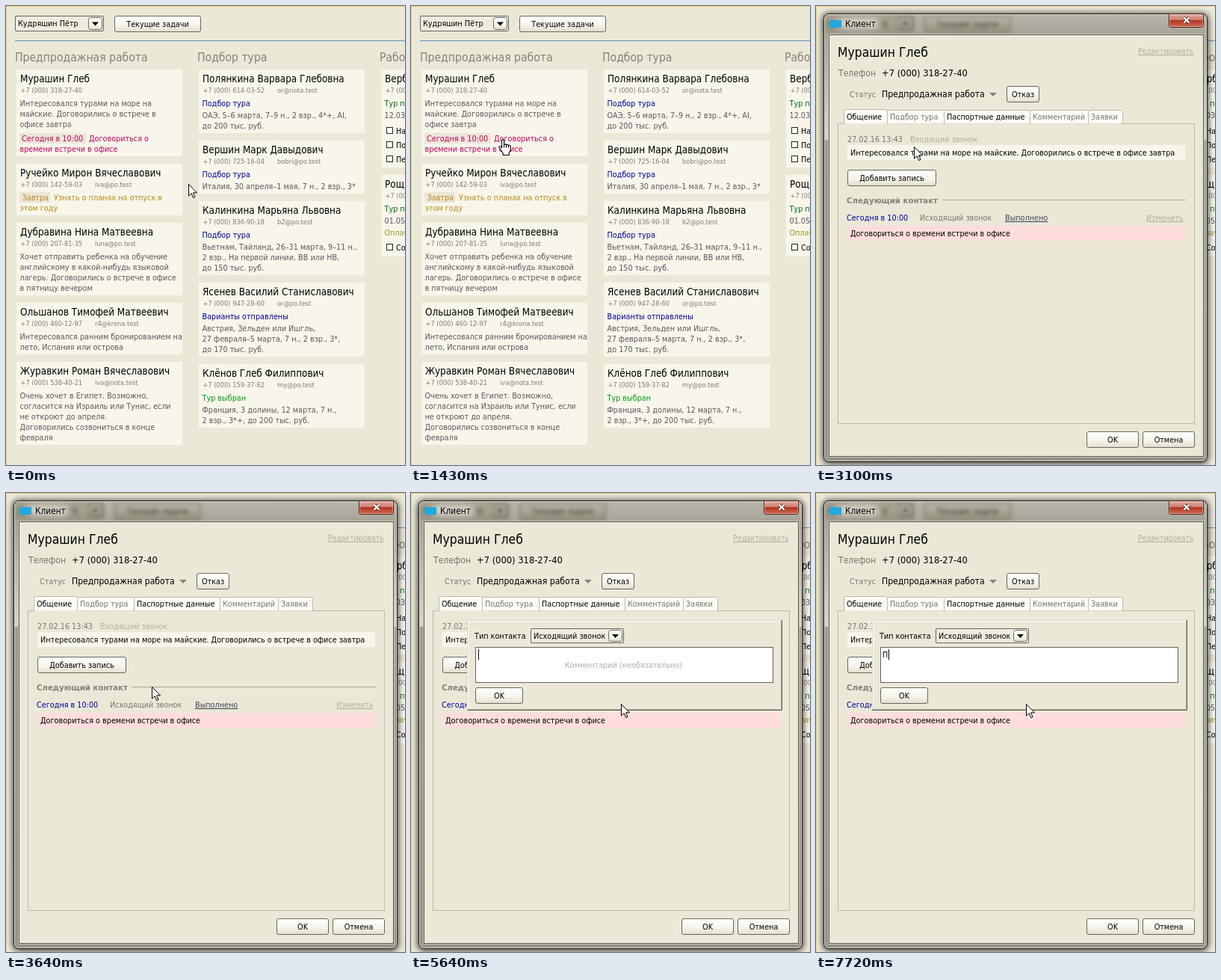
Recreate the animation shown at these times as an HTML page. Size 534 by 614 pixels, loop 8000 ms.

```html
<!DOCTYPE html>
<html lang="ru">
<head>
<meta charset="utf-8">
<title>Клиенты</title>
<style>
html, body { margin: 0; width: 100%; height: 100%; overflow: hidden; background: #ebe8d8; }
svg { display: block; width: 534px; height: 614px; }
text {
  font: 10.75px "DejaVu Sans Condensed", "Liberation Sans", Arial, sans-serif;
  fill: #000; white-space: pre;
}
.mid { text-anchor: middle; }
.head { font-size: 15.6px; fill: #858279; }
.name { font-size: 13.4px; }
.small { font-size: 9.2px; fill: #7d7b76; }
.body { fill: #5b5660; }
.blue { fill: #00009c; }
.green { fill: #009a1c; }
.dark { fill: #006b12; }
.olive { fill: #8f9a1e; }
.red { fill: #c4005e; }
.gold { fill: #b98a16; }
.grey { fill: #78756c; }
.pale { fill: #b3afa0; }
.link { text-decoration: underline; }
.slate { fill: #43435a; }
.big { font-size: 17.4px; }
.mid13 { font-size: 12.8px; }
.mid12 { font-size: 12.1px; }
.bold { font-size: 11.3px; font-weight: bold; fill: #858279; }
.card { fill: #f8f6ea; }
.tag { fill: #ebe6d8; }
.btn { fill: url(#face); stroke: #696860; }
.box { fill: #fff; stroke: #222; }
.combo { fill: #efecdf; stroke: #65645c; }
.haze { filter: url(#haze); mix-blend-mode: multiply; }

/* every change is a hard step on one shared 8 s clock */
#dialog, #popup, #hint, #caret, #typed, #arrow, #hand, #cursor, #glow {
  animation: 8s step-end infinite;
}
#dialog { animation-name: dialog; }
#popup { animation-name: popup; }
#hint { animation-name: hint; }
#caret { animation-name: caret; }
#typed { animation-name: typed; }
#arrow { animation-name: arrow; }
#hand { animation-name: hand; }
#cursor { animation-name: move; }
#glow { animation-name: glow; }
@keyframes dialog { 0% { visibility: hidden } 26.375%, 100% { visibility: visible } }
@keyframes popup { 0% { visibility: hidden } 70.5%, 100% { visibility: visible } }
@keyframes hint { 0%, 96.5%, 100% { visibility: hidden } 70.5% { visibility: visible } }
@keyframes caret {
  0%, 79.125%, 91.25%, 100% { visibility: hidden }
  70.5%, 84.5% { visibility: visible }
}
@keyframes typed { 0% { visibility: hidden } 96.5%, 100% { visibility: visible } }
@keyframes glow { 0%, 45.5%, 100% { visibility: hidden } 44% { visibility: visible } }
@keyframes arrow {
  0%, 26.375%, 70.5%, 100% { visibility: visible }
  11.125%, 50.75% { visibility: hidden }
}
@keyframes hand {
  0%, 26.375%, 70.5%, 100% { visibility: hidden }
  11.125%, 50.75% { visibility: visible }
}
@keyframes move {
  0% { transform: translate(244px, 238px) }
  6.25% { transform: translate(232px, 226px) }
  8% { transform: translate(208px, 207px) }
  9.625% { transform: translate(172px, 192px) }
  11.125% { transform: translate(143px, 183px) }
  13% { transform: translate(136px, 181px) }
  14.5% { transform: translate(131px, 180px) }
  16% { transform: translate(127px, 179px) }
  17.875% { transform: translate(123px, 178px) }
  26.375% { transform: translate(122px, 178px) }
  38.75% { transform: translate(131px, 188px) }
  40.375% { transform: translate(139px, 206px) }
  42.25% { transform: translate(145px, 217px) }
  44% { transform: translate(159px, 233px) }
  45.5% { transform: translate(195px, 259px) }
  47.375% { transform: translate(235px, 270px) }
  49.125% { transform: translate(262px, 280px) }
  50.75% { transform: translate(276px, 284px) }
  52.625%, 100% { transform: translate(281px, 282px) }
}
</style>
</head>
<body>
<svg viewBox="0 0 534 614">
  <defs>
    <linearGradient id="face" x2="0" y2="1">
      <stop stop-color="#fffffc"/><stop offset=".6" stop-color="#f5f3ea"/><stop offset="1" stop-color="#e2decd"/>
    </linearGradient>
    <linearGradient id="glass" x2="0" y2="1">
      <stop stop-color="#b8b5aa"/><stop offset=".05" stop-color="#a5a297"/>
      <stop offset=".28" stop-color="#d6d3c9"/><stop offset=".282" stop-color="#9d9a90"/>
      <stop offset="1" stop-color="#96938a"/>
    </linearGradient>
    <linearGradient id="shut" x2="0" y2="1">
      <stop stop-color="#e3b3a8"/><stop offset=".48" stop-color="#cc7768"/>
      <stop offset=".5" stop-color="#b03420"/><stop offset="1" stop-color="#d46d54"/>
    </linearGradient>
    <filter id="soft" x="-20%" y="-100%" width="140%" height="300%"><feGaussianBlur stdDeviation="4"/></filter>
    <filter id="haze" x="-10%" y="-50%" width="120%" height="200%"><feGaussianBlur stdDeviation="2.5"/></filter>
    <filter id="shade" x="-5%" y="-5%" width="110%" height="110%"><feGaussianBlur stdDeviation="4.5"/></filter>
  </defs>
  <g id="board"></g>
  <g id="dialog"></g>
  <g id="popup"></g>
  <g id="cursor" stroke="#000" fill="#fff">
    <path id="arrow" d="M.5.5V16L4.2 12.6L6.6 18.5L9 17.5L6.5 11.8H11.5Z"/>
    <path id="hand" stroke-width="1.1" d="M-1.5 1.5q1.5-1.8 3 0v6q1.5-1.3 3 .3q1.7-1 3 .6q2.3-.6 2.7 1.2v5.4l-2 3.5v3h-8v-2.5l-3.5-5l-1.8-3q.4-1.8 2.2-1l1.4 1.6zM1.5 7.5v4M4.5 8v3.5M7.5 8.6v3"/>
  </g>
</svg>
<script>
const text = (x, y, s, cls = '') => `<text x="${x}" y="${y}" class="${cls}">${s}</text>`;
const rect = (x, y, w, h, attrs) => `<rect x="${x}" y="${y}" width="${w}" height="${h}" ${attrs}/>`;
const line = (d, color) => `<path d="${d}" fill="none" stroke="${color}"/>`;
const button = (x, y, w, h, s) =>
  rect(x + .5, y + .5, w - 1, h - 1, 'rx="2.5" class="btn"') +
  text(x + w / 2, y + h / 2 + 4, s, 'mid');
const combo = (x, y, w, h, s) =>
  rect(x + .5, y + .5, w - 1, h - 1, 'rx="1.5" class="combo"') +
  text(x + 4, y + 14, s) +
  rect(x + w - 20.5, y + 2.5, 18, h - 5, 'rx="3" class="btn"') +
  `<path d="M${x + w - 16} ${y + h / 2 - 2}h9l-4.5 5z"/>`;

// Lines of a card: [text, class, gap above]
function card(x, y, name, phone, mail, lines) {
  let at = y + 49, out = '';
  lines.forEach(([s, cls = 'body', gap = 14], i) => {
    if (i) at += gap;
    out += text(x + 4.5, at, s, cls);
  });
  return rect(x, y, 222, at + 6 - y, 'class="card"') +
    text(x + 5, y + 17, name, 'name') +
    text(x + 5.5, y + 31, phone, 'small') +
    text(x + 105, y + 31, mail, 'small') + out;
}
const notes = s => s.split('|').map(t => [t]);
const trip = (status, s, cls = 'blue') =>
  [[status, cls], ...notes(s).map(([t], i) => [t, 'body', i ? 14 : 16])];
const check = (y, s) => rect(509.5, y - 4.5, 8, 8, 'class="box"') + text(522, y + 4, s);
const third = (y, h, name, day) =>
  rect(502, y, 222, h, 'class="card"') + text(507, y + 17, name, 'name') +
  text(507.5, y + 31, '+7 (000)', 'small') + text(506.5, y + 49, 'Тур подобран', 'dark') +
  text(506.5, y + 65, day, 'body');

const client = 'Мурашин Глеб', phone = '+7 (000) 318-27-40';
const toolbar = combo(12, 13, 119, 21, 'Кудряшин Пётр') + button(145, 13, 116, 22, 'Текущие задачи');

board.innerHTML =
  rect(0, 0, 534, 614, 'fill="#ebe8d8"') + line('M.5 614V.5H534', '#f5cd72') +
  toolbar + line('M12 46.5H534', '#6292c0') +
  text(12, 74, 'Предпродажная работа', 'head') +
  text(256, 74, 'Подбор тура', 'head') + text(500, 74, 'Работа', 'head') +
  card(14, 85, client, phone, '', [
    ...notes('Интересовался турами на море на|майские. Договорились о встрече в|офисе завтра'),
    ['', 'red', 19], ['времени встречи в офисе', 'red']]) +
  rect(18, 170, 89, 14, 'class="tag"') +
  text(21, 181, 'Сегодня в 10:00', 'red') + text(111, 181, 'Договориться о', 'red') +
  card(14, 211, 'Ручейко Мирон Вячеславович', '+7 (000) 142-59-03', 'iva@po.test',
    [[''], ['этом году', 'gold']]) +
  rect(18, 249, 41, 14, 'class="tag"') +
  text(21.5, 260, 'Завтра', 'gold') + text(64, 260, 'Узнать о планах на отпуск в', 'gold') +
  card(14, 290, 'Дубравина Нина Матвеевна', '+7 (000) 207-81-35', 'luna@po.test',
    notes('Хочет отправить ребенка на обучение|английскому в какой-нибудь языковой|лагерь. Договорились о встрече в офисе|в пятницу вечером')) +
  card(14, 397, 'Ольшанов Тимофей Матвеевич', '+7 (000) 460-12-97', 'r4@krona.test',
    notes('Интересовался ранним бронированием на|лето, Испания или острова')) +
  card(14, 476, 'Журавкин Роман Вячеславович', '+7 (000) 538-40-21', 'iva@nota.test',
    notes('Очень хочет в Египет. Возможно,|согласится на Израиль или Тунис, если|не откроют до апреля.|Договорились созвониться в конце|февраля')) +
  card(258, 85, 'Полянкина Варвара Глебовна', '+7 (000) 614-03-52', 'or@nota.test',
    trip('Подбор тура', 'ОАЭ, 5–6 марта, 7–9 н., 2 взр., 4*+, AI,|до 200 тыс. руб.')) +
  card(258, 180, 'Вершин Марк Давыдович', '+7 (000) 725-16-04', 'bobri@po.test',
    trip('Подбор тура', 'Италия, 30 апреля–1 мая, 7 н., 2 взр., 3*')) +
  card(258, 261, 'Калинкина Марьяна Львовна', '+7 (000) 836-90-18', 'b2@po.test',
    trip('Подбор тура', 'Вьетнам, Тайланд, 26–31 марта, 9–11 н.,|2 взр., На первой линии, BB или HB,|до 150 тыс. руб.')) +
  card(258, 370, 'Ясенев Василий Станиславович', '+7 (000) 947-28-60', 'or@po.test',
    trip('Варианты отправлены', 'Австрия, Зельден или Ишгль,|27 февраля–5 марта, 7 н., 2 взр., 3*,|до 170 тыс. руб.')) +
  card(258, 479, 'Клёнов Глеб Филиппович', '+7 (000) 159-37-82', 'my@po.test',
    trip('Тур выбран', 'Франция, 3 долины, 12 марта, 7 н.,|2 взр., 3*+, до 200 тыс. руб.', 'green')) +
  third(85, 131, 'Вербина', '12.03.16') +
  check(167, 'Написать') + check(186, 'Получить') + check(205, 'Перевод') +
  third(226, 109, 'Рощина', '01.05.16') + text(506.5, 307, 'Оплачено', 'olive') + check(323, 'Собрать');

const tab = (x, w, s, cls, lift = 0) =>
  `<path d="M${x + .5} 157.5V${141.5 - lift}q0-2 2-2h${w - 4}q2 0 2 2V157.5" fill="#fcfbf6" stroke="#bdbba6"/>` +
  text(x + 4, 152, s, cls);

dialog.innerHTML =
  rect(9, 10, 516, 602, 'rx="8" opacity=".8" filter="url(#shade)"') +
  rect(10.5, 10.5, 513, 599, 'rx="7" fill="url(#glass)" stroke="#1c1b18"') +
  `<g class="haze">${toolbar}</g>` +
  rect(30, 17, 54, 13, 'fill="#dedbd1" filter="url(#soft)"') +
  rect(11.5, 11.5, 511, 597, 'rx="6" fill="none" stroke="#e6e3da" stroke-opacity=".85"') +
  rect(16.5, 37.5, 503, 566, 'fill="none" stroke="#d0cdc3" stroke-opacity=".8"') +
  rect(18, 19, 16, 10, 'fill="#1fa9df"') +
  `<text x="39" y="28" style="font-size:11.8px">Клиент</text>` +
  `<path d="M472.5 10.5h46v15q0 3-3 3h-40q-3 0-3-3z" fill="url(#shut)" stroke="#4c211b"/>` +
  `<path d="M473.5 11.5h44v14q0 2-2 2h-40q-2 0-2-2z" fill="none" stroke="#fff" stroke-opacity=".4"/>` +
  `<path d="M492.5 15.5l7 7m0-7l-7 7" stroke="#5a2a24" stroke-width="4"/>` +
  `<path d="M492.5 15.5l7 7m0-7l-7 7" stroke="#fff" stroke-width="2.4"/>` +
  rect(17.5, 38.5, 501, 564, 'fill="#ebe8d8" stroke="#5b5951"') +
  text(29, 68, client, 'big') +
  `<text x="431" y="64" class="pale link" style="font-size:10.4px">Редактировать</text>` +
  text(30, 94, 'Телефон', 'mid12 grey') + text(88, 94, phone, 'mid13') +
  text(45, 122, 'Статус', 'grey') + text(88, 122, 'Предпродажная работа', 'mid12') +
  `<path d="M232 116h10l-5 5z" fill="#858279"/>` + button(255, 107, 44, 22, 'Отказ') +
  rect(29.5, 157.5, 477, 401, 'fill="none" stroke="#bdbba6"') +
  tab(95, 76, 'Подбор тура', 'grey') + tab(171, 115, 'Паспортные данные', '') +
  tab(286, 78, 'Комментарий', 'grey') + tab(364, 46, 'Заявки', 'grey') +
  tab(37, 58, 'Общение', '', 1) + line('M38 157.5H95', '#ebe8d8') +
  text(42, 182, '27.02.16 13:43', 'grey') + text(126, 182, 'Входящий звонок', 'pale') +
  rect(42, 186, 452, 20, 'class="card"') +
  text(46, 200, 'Интересовался турами на море на майские. Договорились о встрече в офисе завтра') +
  button(42, 219, 119, 22, 'Добавить запись') +
  rect(43.5, 220.5, 116, 19, 'id="glow" rx="2" fill="#fff" fill-opacity=".35" stroke="#fff"') +
  text(41, 264, 'Следующий контакт', 'bold') + line('M169 259.5H495', '#a9a698') +
  text(41, 287, 'Сегодня в 10:00', 'blue') + text(139, 287, 'Исходящий звонок', 'grey') +
  text(253, 287, 'Выполнено', 'slate link') + text(442, 287, 'Изменить', 'pale link') +
  rect(42, 294, 452, 20, 'fill="#ffdddd"') +
  text(46, 308, 'Договориться о времени встречи в офисе') +
  button(362, 569, 70, 22, 'OK') + button(437, 569, 70, 22, 'Отмена');

popup.innerHTML =
  rect(75, 170, 422, 121, 'fill="#ebe8d8"') +
  line('M75.5 291V170.5H497', '#d8d4c3') + line('M76.5 290V171.5H496', '#fff') +
  line('M75 290.5H496.5V170', '#65635a') + line('M76 289.5H495.5V171', '#aca899') +
  text(85, 195, 'Тип контакта') + combo(160, 181, 125, 20, 'Исходящий звонок') +
  rect(86.5, 206.5, 398, 47, 'fill="#fff" stroke="#65635a"') +
  `<g id="hint">${text(284.5, 234, 'Комментарий (необязательно)', 'mid pale')}</g>` +
  rect(90, 209, 1, 14, 'id="caret"') +
  `<g id="typed">${text(89, 220, 'П')}${rect(97, 209, 1, 14, '')}</g>` +
  button(86, 260, 64, 22, 'OK');
</script>
</body>
</html>
```
